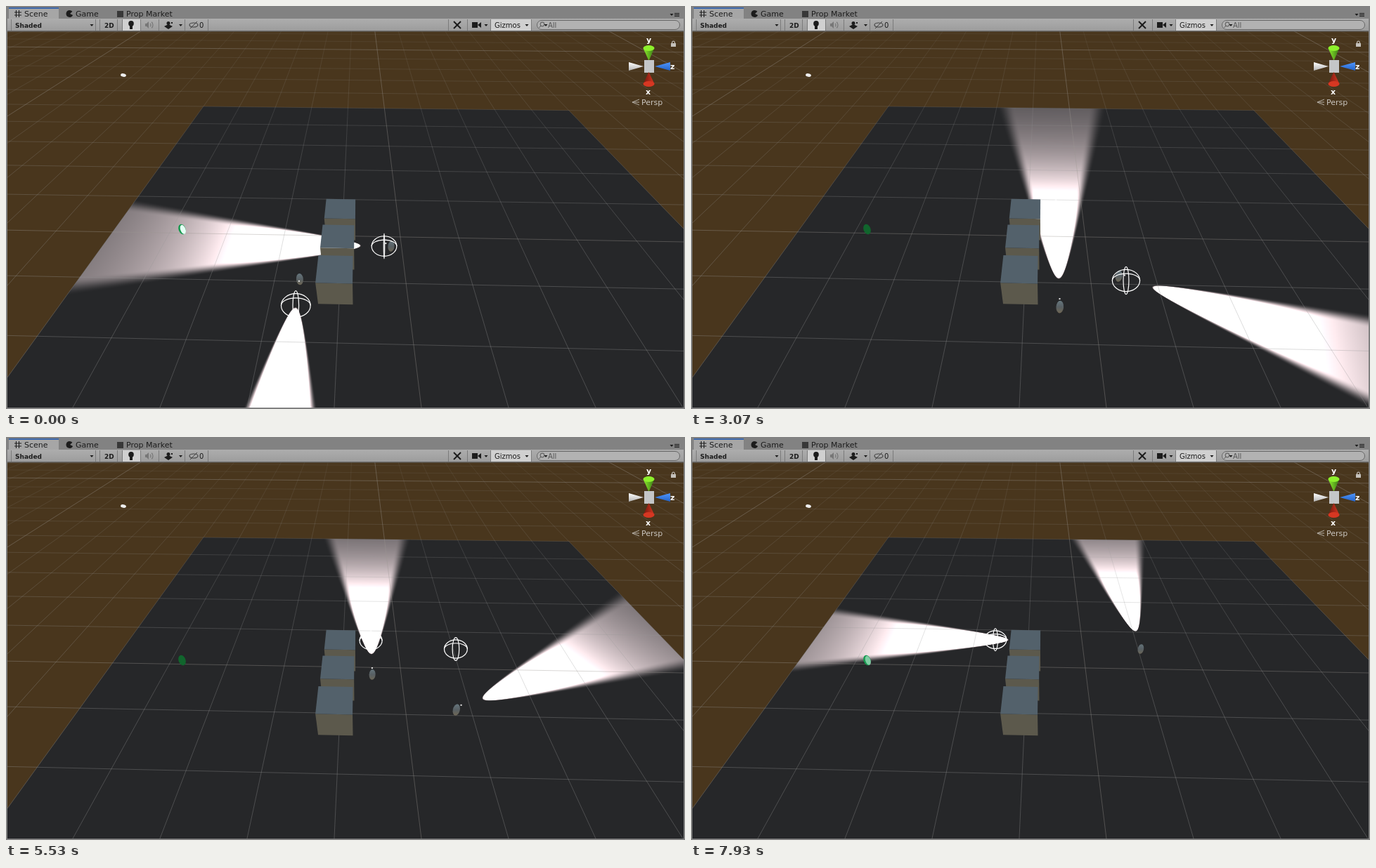
An HTML page with a canvas for the animation above (8 s loop, 966 px wide and 574 px high).

```html
<!DOCTYPE html>
<html lang="en">
<head>
<meta charset="utf-8">
<title>Patrol scene</title>
<style>
  html, body { margin: 0; width: 100%; height: 100%; overflow: hidden; background: #808080; }
  canvas { display: block; }
</style>
</head>
<body>
<canvas id="stage" width="966" height="574"></canvas>
<script>
const W = 966, H = 574, LOOP = 8000, STEPS = 120, TOP = 140;
const ctx = document.getElementById('stage').getContext('2d');
const SANS = '"DejaVu Sans", sans-serif';

// World coordinates: u runs right, v runs away from the viewer, z runs up.
const depth = (u, v, z = 0) => 0.002041 + 0.0002436 * v - 0.00000604 * u - 0.00022 * z;
function project(u, v, z = 0) {
  const w = depth(u, v, z);
  return [500.5 + (0.12346 + 0.1692 * u) / w, -161 + (1 - 0.224 * z) / w];
}
function unproject(x, y) {
  const w = 1 / (y + 161), u = ((x - 500.5) * w - 0.12346) / 0.1692;
  return [u, (w - 0.002041 + 0.00000604 * u) / 0.0002436];
}

function ease(t, from, to) {
  const f = Math.min(1, Math.max(0, (t - from) / (to - from)));
  return f * f * (3 - 2 * f);
}

// Walks a list of { u, v, wait } stops; `wait` is the time to leave that stop.
function walk(route, speed, t) {
  let clock = 0;
  for (let i = 0; i + 1 < route.length; i++) {
    const a = route[i], b = route[i + 1];
    clock = Math.max(clock, a.wait || 0);
    if (t < clock) return { u: a.u, v: a.v };
    const du = b.u - a.u, dv = b.v - a.v, time = Math.hypot(du, dv) / speed;
    if (t < clock + time) {
      const f = (t - clock) / time;
      return { u: a.u + du * f, v: a.v + dv * f, angle: Math.atan2(dv, du), goal: b.via || b };
    }
    clock += time;
  }
  const end = route[route.length - 1];
  return { u: end.u, v: end.v };
}

const LEFT = -1.617, RIGHT = -0.486, NEAR = -1.43, FAR = 0.71;
const ROUTE_A = [{ u: LEFT, v: -0.956 }, { u: LEFT, v: NEAR }, { u: RIGHT, v: NEAR },
  { u: RIGHT, v: FAR }, { u: LEFT, v: FAR }];
const LAST = { u: 1.05, v: 0.514 };
const ROUTE_B = [{ u: -0.172, v: -0.225 }, { u: -0.289, v: -0.225, wait: 2170 },
  { u: 0.539, v: -0.928, wait: 5240 }, { u: 1.03, v: -0.85, via: LAST }, LAST];

function facing(g, angle) {
  return { ...g, dx: Math.cos(angle), dy: Math.sin(angle) };
}
function guardsAt(t) {
  const a = walk(ROUTE_A, 0.000524, t), b = walk(ROUTE_B, 0.00107, t);
  const turn = 180 + 138 * ease(t, 2080, 2340) + 42 * ease(t, 2700, 3480) + 90 * ease(t, 5240, 5880);
  return [facing(a, a.angle), facing(b, turn * Math.PI / 180)];
}

// Brightness on the ground from a soft horizontal cone just above it.
function lightAt(g, u, v) {
  const du = u - g.u, dv = v - g.v, along = du * g.dx + dv * g.dy;
  if (along < 0.45) return 0;
  const across = dv * g.dx - du * g.dy;
  const q2 = (across * across + 0.0137) / (0.0552 * along * along);
  if (q2 >= 1) return 0;
  return 225 * Math.pow(2.7 / along, 1.6) * ease(Math.sqrt(q2), 1, 0.68);
}

const glow = document.createElement('canvas');
glow.width = W;
glow.height = H - TOP;
const glowCtx = glow.getContext('2d'), pixels = glowCtx.createImageData(W, H - TOP);
const groundU = new Float32Array(W * (H - TOP)), groundV = new Float32Array(groundU.length);
for (let i = 0; i < groundU.length; i++) {
  [groundU[i], groundV[i]] = unproject(i % W + 0.5, TOP + Math.floor(i / W) + 0.5);
}

function shape(points, fill) {
  ctx.beginPath();
  points.forEach(p => ctx.lineTo(p[0], p[1]));
  ctx.closePath();
  if (fill) { ctx.fillStyle = fill; ctx.fill(); }
}
function rect(x, y, w, h, fill) { ctx.fillStyle = fill; ctx.fillRect(x, y, w, h); }
function oval(x, y, rx, ry, fill, tilt = 0) {
  ctx.beginPath();
  ctx.ellipse(x, y, rx, ry, tilt, 0, 7);
  ctx.fillStyle = fill;
  ctx.fill();
}
function arc(x, y, rx, ry, color, from = 0, to = Math.PI * 2) {
  ctx.beginPath();
  ctx.ellipse(x, y, rx, ry, 0, from, to);
  ctx.strokeStyle = color;
  ctx.lineWidth = 1.2;
  ctx.stroke();
}
function line(x0, y0, x1, y1, color, width = 1) {
  ctx.beginPath();
  ctx.moveTo(x0, y0);
  ctx.lineTo(x1, y1);
  ctx.strokeStyle = color;
  ctx.lineWidth = width;
  ctx.stroke();
}
function text(label, x, y, size, color, bold = '') {
  ctx.font = `${bold} ${size}px ${SANS}`;
  ctx.fillStyle = color;
  ctx.fillText(label, x, y);
}
function fade(x0, y0, x1, y1, ...colors) {
  const g = ctx.createLinearGradient(x0, y0, x1, y1);
  colors.forEach((c, i) => g.addColorStop(i / (colors.length - 1), c));
  return g;
}

function drawGround(guards) {
  rect(0, 36, W, H, '#49361d');
  const plane = [project(-5, 5), project(5, 5), project(5, -5), project(-5, -5)];
  shape(plane, '#262729');

  pixels.data.fill(0);
  for (let i = 0; i < groundU.length; i++) {
    const light = lightAt(guards[0], groundU[i], groundV[i]) + lightAt(guards[1], groundU[i], groundV[i]);
    if (!light) continue;
    const o = i * 4;
    pixels.data[o] = 38 + light * 1.07;
    pixels.data[o + 1] = 39 + light * 0.97;
    pixels.data[o + 2] = 41 + light * 0.98;
    pixels.data[o + 3] = 255;
  }
  glowCtx.putImageData(pixels, 0, 0);
  ctx.save();
  shape(plane);
  ctx.clip();
  ctx.drawImage(glow, 0, TOP);
  ctx.restore();

  const minor = fade(0, 36, 0, 400, 'rgba(150,150,150,.1)', 'rgba(150,150,150,.25)', 'rgba(150,150,150,.34)');
  const major = 'rgba(155,150,145,.38)';
  for (let u = -25; u <= 25; u++) line(...project(u, -6), ...project(u, 14), u % 10 ? minor : major);
  for (let v = -3; v <= 13; v++) line(...project(-25, v), ...project(25, v), v % 10 ? minor : major);
}

function drawGoal({ u, v }) {
  const [x, y] = project(u, v), r = 0.0355 / depth(u, v);
  arc(x, y, r, r * 0.8, '#fff');
  arc(x, y, Math.abs(x - 520) * 0.04, r, '#fff');
  arc(x, y, r, r * 0.5, '#fff', Math.PI);
}

function drawGuard(g) {
  const [x, y] = project(g.u, g.v), k = 0.0017 / depth(g.u, g.v);
  oval(x, y, 5.3 * k, 8.8 * k, fade(x, y - 8, x, y + 8, '#65757c', '#586064', '#6d6655'), (x - 480) / 700);
  const [ex, ey] = project(g.u + g.dx * 0.09, g.v + g.dy * 0.09);
  if (g.v < 0.2) rect(ex - 1, ey - 5, 2, 2, '#e8e8e8');
}

function drawCube(u, v) {
  const size = 0.5, r = u + size;
  shape([project(u, v), project(r, v), project(r, v, size), project(u, v, size)], '#5c594c');
  shape([project(u, v, size), project(r, v, size), project(r, v + size, size), project(u, v + size, size)], '#53616b');
}

function drawProps(guards) {
  const light = guards.reduce((sum, g) => sum + lightAt(g, ...unproject(250, 318)), 0);
  oval(250.5, 318, 5, 7.5, light > 3 ? '#16994f' : '#11652d', -0.35);
  if (light > 3) {
    ctx.globalAlpha = Math.min(1, light / 90);
    oval(251.8, 318.3, 3.6, 6.8, '#e4fff4', -0.35);
    ctx.globalAlpha = 1;
  }
  oval(167, 98.5, 4, 2.3, '#eee', 0.2);
}

// One arm of the compass: a cone whose tip points at the centre.
function arm(angle, reach, light, dark) {
  ctx.save();
  ctx.translate(914.5, 86);
  ctx.rotate(angle);
  shape([[8, 0], [reach, -8], [reach, 8]], fade(0, -8, 0, 8, light, dark));
  oval(reach, 0, 4, 8, light);
  ctx.restore();
}
function drawCompass() {
  arm(-Math.PI / 2, 26, '#8df02c', '#3b7616');
  rect(908, 77, 14, 18, '#c4c6c8');
  arm(Math.PI / 2, 25, '#d63722', '#72180e');
  shape([[886, 80], [907, 86], [886, 92]], fade(0, 80, 0, 92, '#fff', '#b5b5b5'));
  shape([[945, 80], [923, 86], [945, 92]], fade(0, 80, 0, 92, '#4f96ff', '#2463c5'));
  text('y', 911, 52, 11, '#fff', 'bold');
  text('z', 945, 90, 11, '#fff', 'bold');
  text('x', 910, 126, 11, '#fff', 'bold');
  text('Persp', 904, 141, 11, '#c9c5bf');
  for (const dy of [-4, 0, 4]) line(891, 137, 901, 137 + dy, '#b5afa6');
  rect(946, 53, 7, 5, '#c5c1bb');
  arc(949.5, 53, 2, 3, '#c5c1bb', Math.PI);
}

function drawChrome() {
  const ink = '#1c1c1c', edge = '#808080';
  rect(0, 0, W, 19, '#828282');
  rect(4, 2, 71, 17, '#a6a6a6');
  rect(4, 2, 71, 2, '#3b67aa');
  rect(0, 18, W, 18, fade(0, 18, 0, 36, '#adadad', '#9c9c9c'));
  rect(0, 35, W, 1.5, '#6b6b6b');
  rect(0, 18, 2, H, edge);
  rect(964, 18, 2, H, edge);
  rect(0, 572, W, 2, edge);
  rect(165, 19, 26, 16, '#d0d0d0');
  rect(690, 19, 57, 16, '#d0d0d0');
  for (const x of [7, 127, 133, 158, 165, 191, 217, 254, 287, 629, 656, 689, 747]) rect(x, 19, 1, 16, '#7b7b7b');

  for (const d of [14.5, 18.5]) {
    line(d, 6, d, 16, ink);
    line(12, d - 5.5, 22, d - 5.5, ink);
  }
  text('Scene', 26, 15, 11, ink);
  ctx.beginPath();
  ctx.moveTo(91, 11);
  ctx.arc(90.5, 11, 5, 0.4, 5.6);
  ctx.fill();
  text('Game', 99, 15, 11, ink);
  rect(158, 7, 9, 9, '#383838');
  text('Prop Market', 171, 15, 11, ink);
  text('Shaded', 13, 31, 9, ink, 'bold');
  text('2D', 140, 31, 9, ink, 'bold');
  text('0', 275, 31, 10, ink);
  text('Gizmos', 695, 31, 10, ink);

  const arrow = (x, y) => shape([[x - 2.5, y - 1], [x + 2.5, y - 1], [x, y + 2]], ink);
  for (const x of [122, 248.5, 683, 741]) arrow(x, 27);
  arrow(947, 12);
  for (let y = 10.5; y < 15; y += 2) line(951, y, 958, y, ink);

  oval(178, 25, 3.8, 4, ink);
  rect(176, 28, 4, 5, ink);
  rect(198, 25, 2, 4, '#777');
  shape([[199, 26], [203, 22], [203, 32], [199, 28]], '#777');
  for (const r of [3, 6]) arc(203, 27, r, r, '#777', -0.8, 0.8);
  shape([[225, 29], [231, 26], [237, 29], [231, 33]], ink);
  oval(231, 24.5, 2.5, 2.5, ink);
  rect(235, 23, 2, 2, ink);
  arc(267, 27, 6, 3, '#444');
  line(262, 32, 272, 22, '#444');
  line(637, 32, 647, 22, ink, 2);
  line(637, 22, 647, 32, ink, 2);
  rect(663, 23, 8, 8, ink);
  shape([[671, 27], [676, 23], [676, 31]], ink);

  ctx.beginPath();
  ctx.roundRect(755.5, 20.5, 203, 13, 6.5);
  ctx.fillStyle = '#b2b2b2';
  ctx.fill();
  ctx.strokeStyle = '#676767';
  ctx.lineWidth = 1;
  ctx.stroke();
  arc(763, 26, 2.8, 2.8, '#676767');
  line(761, 28, 758.5, 31, '#555');
  arrow(768, 27);
  text('All', 771, 31, 10, '#555');
}

function draw(t) {
  const guards = guardsAt(t), [a, b] = guards, behind = a.v > 0.3;
  drawGround(guards);
  if (behind) drawGuard(a);
  for (let i = 2; i >= 0; i--) drawCube(-1.3 + 0.015 * i, -1.395 + 0.65 * i);
  if (!behind) drawGuard(a);
  drawGuard(b);
  guards.forEach(g => g.goal && drawGoal(g.goal));
  drawProps(guards);
  drawCompass();
  drawChrome();
}

let shown = -1;
function tick() {
  const step = Math.floor((performance.now() % LOOP) * STEPS / LOOP);
  if (step !== shown) draw(step * LOOP / STEPS);
  shown = step;
  requestAnimationFrame(tick);
}
tick();
</script>
</body>
</html>
```
